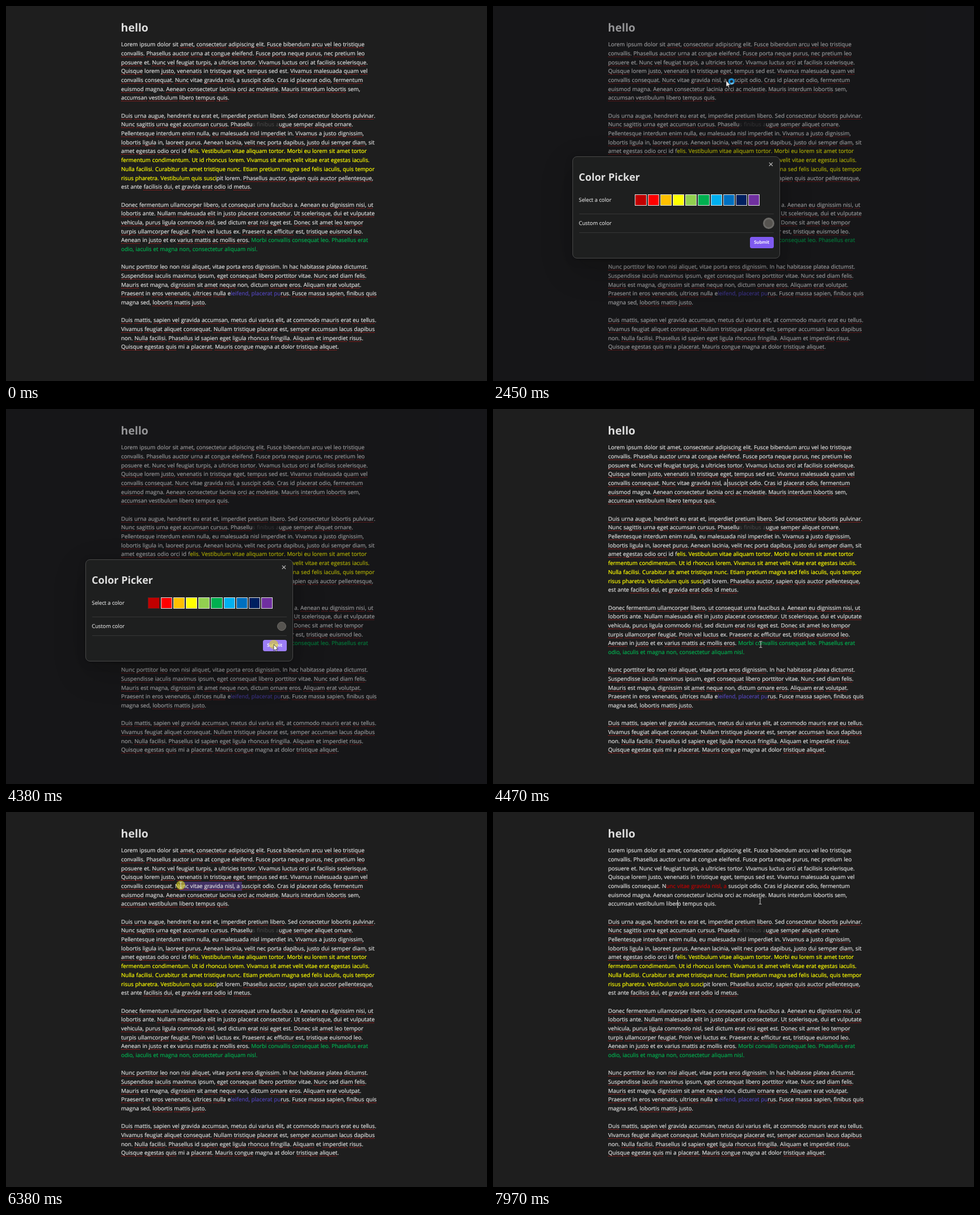
Animation of 848x661 px, one loop 8 s. Source, as an HTML page:

```html
<!DOCTYPE html>
<html lang="en">
<head>
<meta charset="utf-8">
<title>hello</title>
<style>
html, body { margin: 0; width: 100%; height: 100%; overflow: hidden; background: #1e1e1e; }
body {
  position: relative; color: #dedede;
  font: 9.79px "Open Sans", "Noto Sans", sans-serif;
  text-rendering: geometricPrecision;
}
div, span.sw, svg { position: absolute; }
.line {
  left: 203px; line-height: 15.68px; white-space: pre; word-spacing: .31px;
  -webkit-text-stroke: .22px currentColor;
}
u { text-decoration: underline dotted #d81c1c 1px; text-underline-offset: 2px; text-decoration-skip-ink: none; }
b { font-weight: 400; }
.y { color: #ff0; } .g { color: #00b050; } .k { color: #474747; } .v { color: #5145b8; } .r { color: #c00000; }
.label { line-height: 0; white-space: pre; -webkit-text-stroke: .15px currentColor; }

/* everything timed shares one 8 s loop */
.t { animation: 8s step-end infinite; }
#before { animation-name: before; }
#raw { animation-name: raw; }
#after { animation-name: after; }
@keyframes before { 0% { visibility: visible } 80.875%, 100% { visibility: hidden } }
@keyframes raw { 0%, 94.5%, 100% { visibility: hidden } 80.875% { visibility: visible } }
@keyframes after { 0% { visibility: hidden } 94.5%, 100% { visibility: visible } }

#sel { right: 432px; top: 123px; height: 15.5px; background: #423265; animation: sel 8s linear infinite; }
@keyframes sel {
  0%, 69.4% { width: 0; animation-timing-function: steps(14) }
  73.875% { width: 72px }
  76% { width: 72px; animation-timing-function: steps(8) }
  79%, 80.87% { width: 110px }
  80.875%, 100% { width: 0 }
}

.caret { width: 1px; height: 14px; background: #dadada; }
#c1 { left: 413px; top: 123px; animation-name: c1; }
#c2 { left: 555px; top: 123px; animation-name: c2; }
#c3 { left: 325px; top: 155px; animation-name: after; }
@keyframes c1 {
  0%, 16%, 24%, 62.125%, 100% { visibility: hidden }
  10%, 22.25%, 55.875% { visibility: visible }
}
@keyframes c2 {
  0%, 86.5%, 94.5%, 100% { visibility: hidden }
  80.875%, 92.75% { visibility: visible }
}

#modal { inset: 0; animation-name: modal; }
@keyframes modal { 0%, 55.5%, 100% { visibility: hidden } 24% { visibility: visible } }
#cover { inset: 0; background: rgba(8, 7, 14, .34); }
#box {
  left: 140px; top: 265px; width: 364px; height: 178px;
  background: #1e1f1f; border: 1px solid #484848; border-radius: 8px;
  box-shadow: 0 1.2px 4.8px rgba(0,0,0,.07), 0 4px 16px rgba(0,0,0,.11), 0 19.6px 58.7px rgba(8,12,0,.2);
}
h1 { margin: 0; position: absolute; font-weight: 700; line-height: 0; white-space: pre; }
.rule { left: 152px; width: 343px; height: 1px; background: #363636; }
.sw { top: 332px; width: 18.4px; height: 18.4px; border: 1px solid #e2e2e2; }
.sw.t { animation-name: picked; }
@keyframes picked { 0%, 100% { border-color: #e2e2e2 } 38.5%, 99% { border-color: #5c2222 } }
#custom {
  left: 478px; top: 375px; width: 14px; height: 14px; border-radius: 50%;
  background: #565450; border: 1px solid #6d6b67; animation-name: focus;
}
@keyframes focus { 0% { box-shadow: 0 0 0 2px #6b6a67 } 38.5%, 100% { box-shadow: none } }
#submit {
  left: 452.5px; top: 407px; width: 42.5px; height: 19.5px; border-radius: 3.5px;
  background: #7f5af0; animation: hover 8s infinite;
}
@keyframes hover { 0%, 49% { background: #7f5af0 } 50%, 99% { background: #9c7df6 } }

#cur { left: 0; top: 0; animation: move 8s ease-in-out infinite; }
@keyframes move {
  0%, 2% { transform: translate(803px, 608px) }
  9.5%, 32.5% { transform: translate(411px, 131.5px) }
  37.5%, 40.5% { transform: translate(262px, 350px) }
  45.625%, 49% { transform: translate(472px, 404px) }
  50%, 57.75% { transform: translate(472px, 415px) }
  67%, 67.875% { transform: translate(424px, 138px) }
  69%, 69.4% { transform: translate(416px, 130px); animation-timing-function: linear }
  73.875%, 76% { transform: translate(344px, 128px); animation-timing-function: linear }
  79%, 81.25% { transform: translate(308px, 129px) }
  85.25%, 86.25% { transform: translate(424px, 152px) }
  91.25%, 100% { transform: translate(471px, 157px) }
}
#dot {
  left: -8px; top: -8px; width: 16px; height: 16px; border-radius: 50%;
  background: rgba(228, 218, 30, .58); animation-name: press;
}
@keyframes press {
  0%, 10.375%, 39.75%, 55.875%, 80.875%, 96.25%, 100% { visibility: hidden }
  9.75%, 38.5%, 54.75%, 69.4%, 94.5% { visibility: visible }
}
#beam { left: -3px; top: -6px; animation-name: beam; }
@keyframes beam {
  0%, 23.625% { visibility: hidden }
  2%, 55.5%, 100% { visibility: visible }
}
#arrow { left: -1px; top: -1px; animation-name: arrow; }
@keyframes arrow { 0%, 55.5%, 100% { visibility: hidden } 23.625% { visibility: visible } }
#busy { left: 4px; top: -4px; animation-name: busy; }
@keyframes busy { 0%, 32.5%, 100% { visibility: hidden } 28.375% { visibility: visible } }
#busy div {
  width: 5px; height: 5px; border: 3px solid #1592dc; border-top-color: #6cc8fa;
  border-radius: 50%; background: #20262b; animation: spin 1s linear infinite;
}
@keyframes spin { to { transform: rotate(360deg) } }
</style>
</head>
<body>
<div id="sel"></div>
<h1 style="left:202.6px;top:37.8px;font-size:19.5px">hello</h1>
<div id="before" class="t"></div>
<div id="raw" class="t"></div>
<div id="after" class="t"></div>
<div id="rest"></div>
<div id="c1" class="caret t"></div>
<div id="c2" class="caret t"></div>
<div id="c3" class="caret t"></div>

<div id="modal" class="t">
  <div id="cover"></div>
  <div id="box"></div>
  <svg style="left:486px;top:275px" width="8" height="8" stroke="#bcbcbc" stroke-width="1.1"><path d="M.8 .8 7 7M7 .8 .8 7"/></svg>
  <h1 style="left:151px;top:301.7px;font-size:18.06px">Color Picker</h1>
  <div class="label" style="left:151.3px;top:342px;font-size:9.3px">Select a color</div>
  <div class="label" style="left:151.3px;top:382.6px;font-size:9.3px">Custom color</div>
  <div id="swatches"></div>
  <div class="rule" style="top:365.5px"></div>
  <div class="rule" style="top:399px"></div>
  <div id="custom" class="t"></div>
  <div id="submit"></div>
  <div class="label" style="left:460.3px;top:417px;font-size:7.75px;font-weight:600;color:#fff">Submit</div>
</div>

<div id="cur">
  <div id="dot" class="t"></div>
  <svg id="beam" class="t" width="6" height="12" fill="none" stroke="#e4e4e4" stroke-width=".9"><path d="M.6 .6H2.4L3 1.2 3.6 .6H5.4M3 1V11M.6 11.4H2.4L3 10.8 3.6 11.4H5.4"/></svg>
  <svg id="arrow" class="t" width="10" height="15" fill="#fff" stroke="#111" stroke-width=".7"><path d="M1 1V12L3.5 9.7 5.2 13.6 6.9 12.9 5.2 9.1H8.7Z"/></svg>
  <div id="busy" class="t"><div></div></div>
</div>

<script>
const first = `Lorem ipsum dolor sit amet, consectetur adipiscing elit. Fusce bibendum arcu vel leo tristique
convallis. Phasellus auctor urna at congue eleifend. Fusce porta neque purus, nec pretium leo
posuere et. Nunc vel feugiat turpis, a ultricies tortor. Vivamus luctus orci at facilisis scelerisque.
Quisque lorem justo, venenatis in tristique eget, tempus sed est. Vivamus malesuada quam vel
convallis consequat. Nunc vitae gravida nisl, a suscipit odio. Cras id placerat odio, fermentum
euismod magna. Aenean consectetur lacinia orci ac molestie. Mauris interdum lobortis sem,
accumsan vestibulum libero tempus quis.`.split("\n");

// [x...] colours a run with class x
const rest = `Duis urna augue, hendrerit eu erat et, imperdiet pretium libero. Sed consectetur lobortis pulvinar.
Nunc sagittis urna eget accumsan cursus. Phasellu[ks finibus a]ugue semper aliquet ornare.
Pellentesque interdum enim nulla, eu malesuada nisl imperdiet in. Vivamus a justo dignissim,
lobortis ligula in, laoreet purus. Aenean lacinia, velit nec porta dapibus, justo dui semper diam, sit
amet egestas odio orci id f[yelis. Vestibulum vitae aliquam tortor. Morbi eu lorem sit amet tortor]
[yfermentum condimentum. Ut id rhoncus lorem. Vivamus sit amet velit vitae erat egestas iaculis.]
[yNulla facilisi. Curabitur sit amet tristique nunc. Etiam pretium magna sed felis iaculis, quis tempor]
[yrisus pharetra. Vestibulum quis susci]pit lorem. Phasellus auctor, sapien quis auctor pellentesque,
est ante facilisis dui, et gravida erat odio id metus.

Donec fermentum ullamcorper libero, ut consequat urna faucibus a. Aenean eu dignissim nisi, ut
lobortis ante. Nullam malesuada elit in justo placerat consectetur. Ut scelerisque, dui et vulputate
vehicula, purus ligula commodo nisl, sed dictum erat nisi eget est. Donec sit amet leo tempor
turpis ullamcorper feugiat. Proin vel luctus ex. Praesent ac efficitur est, tristique euismod leo.
Aenean in justo et ex varius mattis ac mollis eros. [gMorbi convallis consequat leo. Phasellus erat]
[godio, iaculis et magna non, consectetur aliquam nisl.]

Nunc porttitor leo non nisi aliquet, vitae porta eros dignissim. In hac habitasse platea dictumst.
Suspendisse iaculis maximus ipsum, eget consequat libero porttitor vitae. Nunc sed diam felis.
Mauris est magna, dignissim sit amet neque non, dictum ornare eros. Aliquam erat volutpat.
Praesent in eros venenatis, ultrices nulla e[vleifend, placerat pu]rus. Fusce massa sapien, finibus quis
magna sed, lobortis mattis justo.

Duis mattis, sapien vel gravida accumsan, metus dui varius elit, at commodo mauris erat eu tellus.
Vivamus feugiat aliquet consequat. Nullam tristique placerat est, semper accumsan lacus dapibus
non. Nulla facilisi. Phasellus id sapien eget ligula rhoncus fringilla. Aliquam et imperdiet risus.
Quisque egestas quis mi a placerat. Mauris congue magna at dolor tristique aliquet.`.split("\n");

const known = new Set("lorem ipsum dolor sit a at et in id est ante sed sem non magna pit ex mi vitae dictum e f n".split(" "));
const escape = s => s.replace(/</g, "&lt;");
const spell = s => s.replace(/[A-Za-z]+/g, w => known.has(w.toLowerCase()) ? w : `<u>${w}</u>`);

function markup(line, checked) {
  return line.split(/(\[[^\]]*\])/).map(part =>
    part[0] === "[" ? `<b class="${part[1]}">${part.slice(2, -1)}</b>`
      : checked ? spell(part) : escape(part)).join("");
}

function fill(id, lines, row, checked) {
  document.getElementById(id).innerHTML = lines.map((line, i) =>
    `<div class="line" style="top:${(60.45 + 15.67 * (row + i)).toFixed(2)}px">${markup(line, checked)}</div>`).join("");
}

const raw = [
  ...first.slice(0, 4),
  'convallis consequat. N<span style="color:#c00000">unc vitae gravida nisl, a </span>suscipit odio.',
  "Cras id placerat odio, fermentum euismod magna. Aenean consectetur lacinia orci ac molestie.",
  "Mauris interdum lobortis sem, accumsan vestibulum libero tempus quis."
];
const phrase = "unc vitae gravida nisl, a ";

fill("before", first, 0, true);
fill("raw", raw, 0, false);
fill("after", first.map(s => s.replace(phrase, `[r${phrase}]`)), 0, false);
fill("rest", rest, 8, true);

const palette = "c00000 ff0000 ffc000 ffff00 92d050 00b050 00b0f0 0070c0 002060 7030a0".split(" ");
document.getElementById("swatches").innerHTML = palette.map((c, i) =>
  `<span class="sw${i ? "" : " t"}" style="left:${250.3 + 22.2 * i}px;background:#${c}"></span>`).join("");
</script>
</body>
</html>
```
